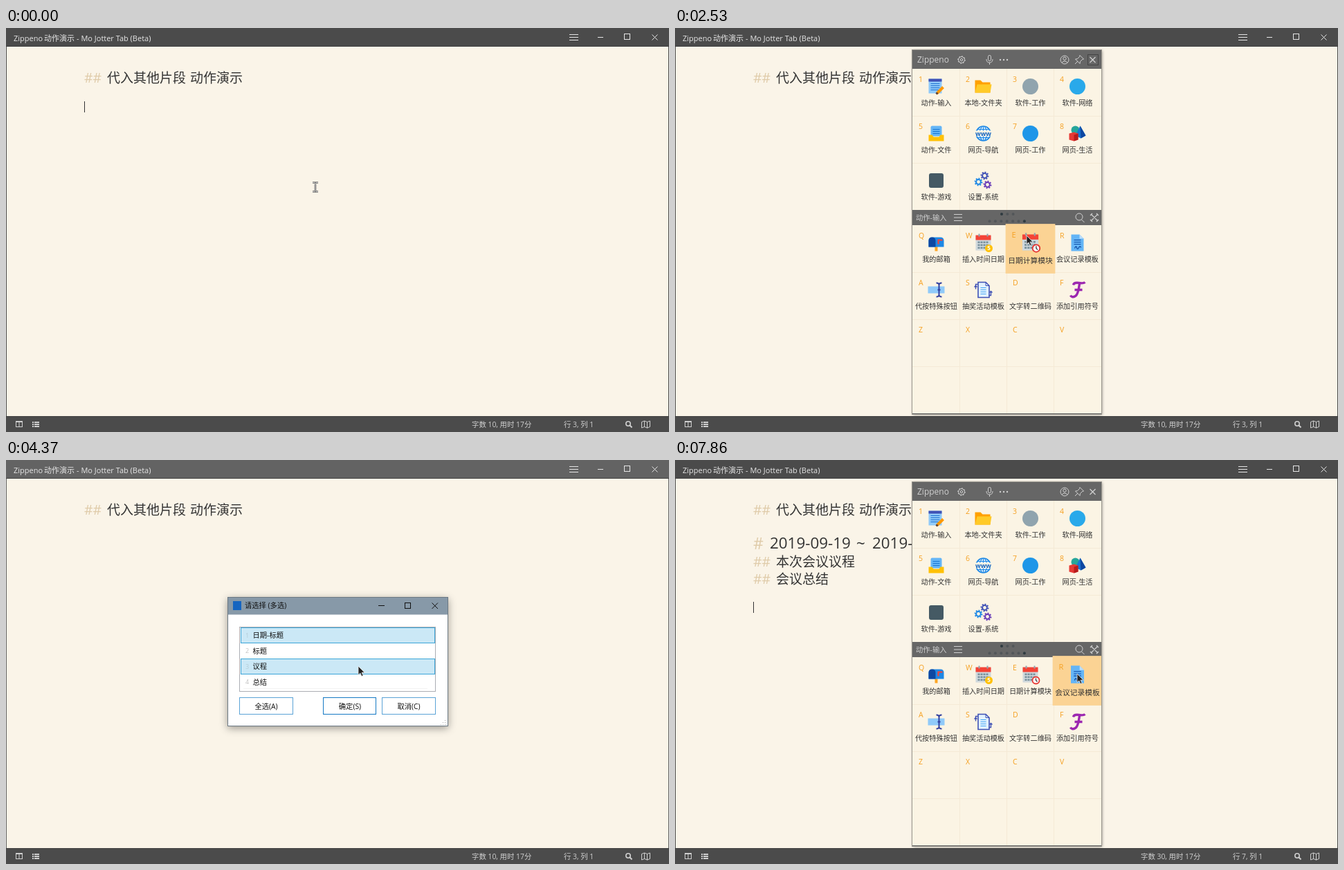
Write an HTML page that moves like this. It is 958 px wide and 584 px high and loops after 8000 ms.

```html
<!DOCTYPE html>
<html lang="zh-CN">
<head>
<meta charset="utf-8">
<title>动作演示</title>
<style>
  html, body { margin: 0; width: 100%; height: 100%; overflow: hidden; background: #faf4e8; }
  svg { display: block; width: 100%; height: 100%; }
  text { font-family: "Open Sans", "Noto Sans CJK SC", "Noto Sans CJK", sans-serif; white-space: pre; }
</style>
</head>
<body>
<svg id="stage" viewBox="0 0 958 584"></svg>
<script>
const LOOP = 8000;
const stage = document.getElementById('stage');

// Shape helpers; text is placed by its vertical centre.
const R = (x, y, w, h, fill, more = '') => `<rect x="${x}" y="${y}" width="${w}" height="${h}" fill="${fill}" ${more}/>`;
const C = (x, y, r, fill, more = '') => `<circle cx="${x}" cy="${y}" r="${r}" fill="${fill}" ${more}/>`;
const P = (d, stroke, w = 1, fill = 'none') => `<path d="${d}" stroke="${stroke}" stroke-width="${w}" fill="${fill}"/>`;
const T = (x, y, s, size, fill, more = '') => `<text x="${x}" y="${y + size * .37}" font-size="${size}" fill="${fill}" ${more}>${s}</text>`;
const G = (body, transform, more = '') => `<g transform="${transform}" ${more}>${body}</g>`;
const frame = (x, y, w, h, fill, stroke) => R(x + .5, y + .5, w - 1, h - 1, fill, `stroke="${stroke}"`);
const MID = 'text-anchor="middle"';
const rows = (x, w, ys, color) => P(ys.map(y => `M${x},${y}h${w}`).join(''), color);
const gear = (x, y, r, c, w = 2) => C(x, y, r, 'none', `stroke="${c}" stroke-width="${w}"`) +
  C(x, y, r + w * .8, 'none', `stroke="${c}" stroke-width="${w}" pathLength="16" stroke-dasharray="1"`);

// Icons, centred on 0,0
const form = R(-11, -11, 19, 21, '#90caf9') + R(-11, -11, 19, 4, '#3f51b5') +
  rows(-8, 13, [-4, -1, 2, 5], '#1e6fd0') + P('M1,10L10,1', '#ff9800', 4) + P('M0,11l2,-2', '#5d4037', 3);
const folder = P('M-12,-9h8l3,3h11v15h-22z', 'none', 0, '#ffa000') + P('M-9,-3h21l-2,12h-22z', 'none', 0, '#ffca28');
const tray = R(-8, -11, 16, 15, '#64b5f6', 'rx="2"') + rows(-5, 10, [-6, -3, 0], '#1976d2') +
  P('M-11,2h5l2,3h8l2,-3h5v9h-22z', 'none', 0, '#ffc107');
const globe = C(0, 0, 10.5, '#e3f2fd', 'stroke="#1e88e5" stroke-width="1.6"') +
  P('M0,-10v20M-9,-6h18M-9,6h18M-2,-10q-7,10 0,20M2,-10q7,10 0,20', '#1e88e5', 1.2) +
  R(-12, -4, 24, 8, '#faf3e3') + T(0, 0, 'www', 9, '#1565c0', MID + ' font-weight="700"');
const shapes = C(-3, -5, 6, '#26a69a') + P('M4,-11L12,3L5,7L-3,3z', 'none', 0, '#1976d2') + P('M4,-11L12,3L5,7z', 'none', 0, '#0d47a1') +
  P('M-12,0l7,-2l6,2v9l-6,2l-7,-2z', 'none', 0, '#e53935') + P('M-5,2l6,-2v9l-6,2z', 'none', 0, '#b71c1c');
const gears = gear(2, -7, 3.4, '#3f51b5') + gear(-7, 2, 3.4, '#1e88e5') + gear(6, 6, 3.4, '#673ab7');
const list = R(-11, -9, 22, 18, '#bbdefb') + R(-11, -9, 22, 3, '#64b5f6') + rows(0, 8, [-2, 4], '#1976d2') +
  R(-8, -4, 5, 4, '#42a5f5') + R(-8, 2, 5, 4, '#42a5f5');
const side = d => R(-10, -10, 14, 20, '#90caf9') + R(4, -10, 7, 20, '#455a64') + rows(6, 3, [-6, -2, 2, 6], '#90a4ae') +
  G(P('M-5,0h9M1,-3.5l3.5,3.5l-3.5,3.5', '#1565c0', 2), `translate(-2 0) scale(${d} 1)`);
const send = R(-10, -7, 17, 18, '#a6d4fa') + P('M-2,2L8,-8M0,-8.5H8.5V0', '#303f9f', 3.6);
const scroll = R(-6, -10, 15, 19, '#90caf9') + C(9, -7, 3, '#64b5f6') + R(-12, 5, 17, 5, '#64b5f6', 'rx="2"') +
  rows(-3, 8, [-5, -2, 1], '#1976d2');
const toolbar = R(-9, -12, 18, 24, '#64b5f6') + R(-7, -9, 14, 4, '#1565c0') + R(-7, -3, 14, 13, '#90caf9');
const sync = P('M-7.5,-11h11l5,5v17h-16z', '#3f51b5', 1.6, '#e3f2fd') + P('M3.5,-11v5h5', '#3f51b5') +
  rows(-4, 8, [-3, 0, 3, 6], '#42a5f5') + P('M-11,-1v-7h3M8,8h3v-6M-13,-4l2,-2l2,2M9,4l2,-2l2,2', '#3f51b5', 1.4);
const term = R(-10, -10, 20, 20, '#263238') + R(-10, -10, 20, 4, '#607d8b') + P('M-6,-2l3,3l-3,3M0,4h5', '#4dd0e1', 1.6);
const history = R(-12, -10, 13, 16, '#64b5f6') + R(-1, -5, 13, 16, '#90caf9') +
  P('M-10,-2h7M-6,-5l3,3l-3,3M10,4h-7M6,1l-3,3l3,3', '#0d47a1', 1.7);
const eye = R(-11, -9, 22, 18, '#bbdefb') + P('M-7,0q7,-8 14,0q-7,8 -14,0z', '#78909c', .8, '#fff') +
  C(0, 0, 3, '#26a69a') + C(0, 0, 1.4, '#263238');
const full = [0, 90, 180, 270].map(a => G(P('M3.5,-3.5L9,-9M4,-9.5H9.5V-4', '#2196f3', 2.2), `rotate(${a})`)).join('');
const mailbox = R(-2, 5, 4, 7, '#ffa726') + P('M-11,6v-9q0,-5 5,-5h12q5,0 5,5v9z', 'none', 0, '#1e88e5') +
  P('M-11,6v-9q0,-5 5,-5q5,0 5,5v9z', 'none', 0, '#0d47a1') + P('M3,2v-6h6', '#f44336', 2.2);
const calendar = R(-11, -10, 22, 21, '#cfd8dc') + R(-11, -11, 22, 7, '#f44336') + P('M-6,-13v4M6,-13v4', '#90a4ae', 2) +
  [-2, 2, 6].map(y => [-8, -4, 0, 4].map(x => R(x, y, 3, 2.5, '#78909c')).join('')).join('');
const coinDate = calendar + C(8, 8, 5.5, '#ffc107') + T(8, 8, '5', 8, '#fff', MID + ' font-weight="700"');
const clockDate = calendar + C(8, 8, 5, '#fff', 'stroke="#e53935" stroke-width="1.8"') + P('M8,5v3l2,2', '#333', 1.2);
const minutes = P('M-9,-12h12l6,6v18h-18z', 'none', 0, '#64b5f6') + P('M3,-12v6h6z', 'none', 0, '#bbdefb') +
  rows(-5, 10, [-4, -1, 2], '#0d47a1') + P('M-4,8q2,-5 3,-1t3,0t3,0', '#0d47a1', 1.2);
const field = R(-12, -5, 24, 10, '#90caf9') + P('M0,-10q4,0 4,3v14q0,3 -4,3M8,-10q-4,0 -4,3v14q0,3 4,3M2,0h4', '#303f9f', 2);
const fancy = P('M-6,-7q1,-4 8,-3t9,-1M3,-9q-2,16 -6,18q-5,3 -7,-1M-4,0h11', '#9c27b0', 3.4);

const TOP = [['动作-输入', form], ['本地-文件夹', folder], ['软件-工作', C(0, 0, 11.5, '#90a4ae')], ['软件-网络', C(0, 0, 11.5, '#29a9ea')],
  ['动作-文件', tray], ['网页-导航', globe], ['网页-工作', C(0, 0, 11.5, '#1e96e8')], ['网页-生活', shapes],
  ['软件-游戏', R(-10.5, -10.5, 21, 21, '#455a64', 'rx="3"')], ['设置-系统', gears], , ,];
const EXPORT = [['打开文档库', list], ['打开文档列表', side(1)], ['打开即时预览', side(-1)], ['导出文档', send],
  ['查看目录', scroll], ['显示工具栏', toolbar], ['专注模式', form], ['美化格式', sync], , , , ,
  ['命令面板', term], ['查看历史记录', history], ['查看预览', eye], ['全屏显示', full]];
const INPUT = [['我的邮箱', mailbox], ['插入时间日期', coinDate], ['日期计算模块', clockDate], ['会议记录模板', minutes],
  ['代按特殊按钮', field], ['抽奖活动模板', sync], ['文字转二维码', ''], ['添加引用符号', fancy], , , , , , , , ,];

// Screen refreshes: first time, last time, number of steps
const TICKS = [[0, 0, 1], [290, 370, 2], [830, 830, 1], [1300, 1300, 1], [1510, 1800, 5], [1960, 2690, 11], [2770, 3350, 9],
  [3490, 3780, 5], [3930, 3930, 1], [4090, 4370, 5], [4510, 4730, 4], [4890, 4960, 2], [5170, 5310, 3], [5460, 5900, 7],
  [6040, 6120, 2], [6430, 6430, 1], [6730, 6730, 1], [7180, 7180, 1], [7560, 7860, 5]];
const MOUSE = [[0, 447, 230], [830, 447, 232], [1440, 447, 232], [1800, 374, 92], [1960, 374, 92], [2544, 508, 300],
  [2690, 582, 316], [3060, 587, 325], [3420, 587, 325], [3780, 505, 258], [4020, 505, 258], [4300, 509, 298],
  [4440, 509, 298], [4730, 500, 340], [4820, 500, 340], [4960, 494, 328], [5100, 494, 328], [5310, 492, 355],
  [5400, 492, 355], [5820, 499, 299], [7500, 499, 299], [7860, 581, 309], [LOOP, 581, 309]];
const CARET = [[0, 370, 113, 106], [830, 1300, 113, 106], [1800, 2300, 113, 106], [5820, 6040, 222, 163],
  [6430, 6730, 113, 185], [6730, 7180, 113, 205], [7560, LOOP, 113, 205]];

const within = (t, a, b) => t >= a && t < b;
const clamp = v => Math.max(0, Math.min(1, v));

function snap(t) {
  const [a, b, n] = TICKS.filter(s => s[0] <= t).pop();
  if (n === 1) return a;
  const step = (b - a) / (n - 1);
  return a + step * Math.min(n - 1, Math.floor((t - a + 14) / step));
}

function mouseAt(t) {
  const i = MOUSE.findIndex(k => k[0] > t);
  const [t0, x0, y0] = MOUSE[i - 1], [t1, x1, y1] = MOUSE[i];
  const p = (t - t0) / (t1 - t0);
  return [x0 + (x1 - x0) * p, y0 + (y1 - y0) * p];
}

function editor(t) {
  const done = t >= 5820, bar = within(t, 2980, 5600) ? '#636363' : '#4b4b4b', ink = '#e6e6e6';
  const hash = (y, s, size) => T(113, y, s, size, '#dfcba9');
  const line = (y, s) => hash(y, '##', 19.4) + T(146, y, s, 19, '#333');
  const row = t >= 6730 ? 7 : t >= 6430 ? 6 : done ? 5 : 3;
  const col = within(t, 5820, 6430) ? 8 : 1;
  let s = R(0, 0, 958, 584, '#faf4e8') + R(0, 0, 958, 27, bar) + R(0, 26, 958, 1, '#404040') +
    R(0, 27, 1, 534, bar) + R(957, 27, 1, 534, bar) + R(0, 561, 958, 23, '#4b4b4b') + R(0, 561, 958, 1, '#404040') +
    T(11, 14.5, 'Zippeno', 11, ink) + T(55, 14.5, '动作演示', 11, ink) + T(102, 14.5, '- Mo Jotter Tab (Beta)', 11, ink) +
    rows(814, 13, [9.5, 13.5, 17.5], ink) + rows(855, 8, [13.5], ink) +
    frame(893, 8, 9, 9, 'none', ink) + P('M933.5,9.5l8,8m0,-8l-8,8', ink) +
    line(72, '代入其他片段') + T(266, 72, '动作演示', 19, '#333');
  if (done) s += hash(120, '#', 23) + T(137, 120, '2019-09-19', 22.4, '#333') + T(262, 120, '~', 22.4, '#333') +
    T(285, 120, '2019-09-26-', 22.4, '#333') + T(411, 120, '会议记录', 23, '#333') +
    line(147, '本次会议议程') + line(172, '会议总结');
  for (const [a, b, x, y] of CARET) if (within(t, a, b)) s += R(x, y, 1, x > 200 ? 18 : 16, '#333');
  const dim = '#cfcfcf';
  return s + T(673, 573, `字数 ${done ? 30 : 10}, 用时 17分`, 10.4, dim) + T(806, 573, `行 ${row}, 列 ${col}`, 10.4, dim) +
    frame(14, 568, 10, 9, 'none', dim) + P('M19,568v9M14,569.5h10', dim) +
    [569, 572, 575].map(y => R(38, y, 2, 2, dim) + R(41, y, 7, 2, dim)).join('') +
    C(899, 572, 3.2, 'none', `stroke="${dim}" stroke-width="1.6"`) + P('M901.5,574.5l3,3', dim, 2) +
    P('M918.5,569.5l4,-1.5l4,1.5l4,-1.5v8.5l-4,1.5l-4,-1.5l-4,1.5zM922.5,568v9M926.5,569.5v9', dim);
}

function cells(top, keys, items, [mx, my]) {
  const hot = my >= top && mx >= 343 && mx < 616 ? Math.floor((my - top) / 68) * 4 + Math.floor((mx - 343) / 68.2) : -1;
  const n = items.length / 4;
  let s = R(343, top, 273, n * 68, '#fbf4e4'), last = '';
  for (let c = 1; c < 4; c++) s += R(343 + c * 68, top, 1, n * 68, '#f5ead6');
  for (let r = 1; r < n; r++) s += R(343, top + r * 68, 273, 1, '#f5ead6');
  for (let i = 0; i < items.length; i++) {
    const over = i === hot && items[i];
    let cell = over ? R(-34, -34, 68, 68, '#fbd394') : '';
    if (keys[i]) cell += T(-25.5, -19, keys[i], 10.5, '#f5a021');
    if (items[i]) cell += G(items[i][1], 'translate(0 -8.5)') + T(0, 15.7, items[i][0], 10.2, '#333', MID);
    cell = G(cell, `translate(${377.5 + i % 4 * 68} ${top + 34 + (i >> 2) * 68})${over ? ' scale(1.055)' : ''}`);
    if (over) last = cell; else s += cell;
  }
  return s + last;
}

function panel(t, mouse) {
  const input = t >= 1960, ink = '#d0d0d0', bar = '#666';
  const n = input ? 7 : 6, x0 = input ? 454.5 : 459, on = input ? 6 : 0, menu = input ? 403 : 425;
  const dot = (x, y, hot) => C(x, y, 2, hot ? '#2f3a40' : '#525659');
  let s = R(343, 32, 273, 27, bar) + T(350, 46, 'Zippeno', 12, ink) + gear(414, 46, 4.4, ink, 1) + C(414, 46, 1.7, 'none', `stroke="${ink}"`) +
    R(452.5, 39.5, 4, 8, 'none', `rx="2" stroke="${ink}"`) + P('M450,45q0,5 4.5,5t4.5,-5M454.5,50v3', ink) +
    [470, 475, 480].map(x => C(x, 46, 1.2, ink)).join('') +
    C(563, 46, 6, 'none', `stroke="${ink}"`) + C(563, 44.2, 2.2, 'none', `stroke="${ink}"`) + P('M559,50q4,-4 8,0', ink) +
    P('M585,39.5l5.5,5.5l-2,.5l-3,3l-.5,3l-6.5,-6.5l3,-.5l3,-3zM582,48l-4,4', ink) + P('M599.5,42l8,8m0,-8l-8,8', ink, 1.3);
  if (t < 2770) s += R(596.5, 38.5, 15, 15, 'none', 'stroke="#222" stroke-dasharray="1"');
  s += cells(59, '12345678', TOP, my(mouse, 59, 263)) + R(343, 263, 273, 22, bar);
  s += input ? T(348, 274, '动作-输入', 10.3, ink) : C(354, 274, 6, '#f79a1c') + T(364, 274, '界面与导出', 10.3, ink);
  s += rows(menu, 12, [269.5, 274, 278.5], ink);
  for (let i = 0; i < 3; i++) s += dot(472 + i * 8.3, 269, !i);
  for (let i = 0; i < n; i++) s += dot(x0 + i * 8.4, 279.3, i === on);
  s += C(584, 273, 5, 'none', `stroke="${ink}"`) + P('M587.5,277l4,4', ink) +
    P('M601,269l10,10M611,269l-10,10M600,271l3,-3M609,268l3,3M600,277l3,3M609,280l3,-3', ink, 1.2) +
    cells(285, 'QWERASDFZXCV', input ? INPUT : EXPORT, my(mouse, 285, 557));
  return R(343, 32, 273, 526, bar, 'filter="url(#soft)"') + `<g clip-path="url(#pane)">${s}</g>` +
    frame(342, 31, 275, 528, 'none', '#9a978f');
}

// Keeps the pointer only while it lies between two heights.
function my(mouse, a, b) { return within(mouse[1], a, b) ? mouse : [-1, -1]; }

function dialog(t, [mx, y]) {
  const fading = t > 5400;
  const p = fading ? clamp(1 - (t - 5390) / 250) : clamp((t - 3000) / 280);
  const scale = fading ? 1 - .06 * (1 - p) : 1 - .09 * (1 - p) ** 2;
  const picked = [3930, LOOP, 4370, 4960];
  let s = R(320, 198, 319, 187, '#fff', 'filter="url(#deep)"') + R(320, 198, 319, 25.5, '#8799a8') +
    frame(320, 198, 319, 187, 'none', '#6b7883') + R(328, 204, 12, 13, '#1565c0') + T(345, 210.5, '请选择 (多选)', 10.3, '#111') +
    rows(538, 9, [210.5], '#111') + frame(576, 206, 9, 9, 'none', '#111') + P('M615.5,206.5l8.5,8.5m0,-8.5l-8.5,8.5', '#111') +
    frame(337, 241, 284, 94, '#fff', '#abadb3');
  ['日期-标题', '标题', '议程', '总结'].forEach((name, i) => {
    const top = 242 + i * 22.5, on = t >= picked[i], over = within(y, top, top + 22.5) && within(mx, 339, 620);
    s += R(343, Math.round(top + 20), 266, 1, '#f2f2f2');
    if (on || over) s += frame(339, Math.round(top), 281, 23, on ? '#cbe8f6' : '#e5f3fb', on ? '#3aa5d8' : '#70c0e7');
    s += T(346, top + 11.5, i + 1, 9, on ? '#b4cdd8' : '#c4c4c4') + T(356.5, top + 11.3, name, 10.3, '#111');
  });
  [[337, '全选(A)'], [458, '确定(S)'], [543, '取消(C)']].forEach(([x, name], i) => {
    const over = within(mx, x, x + 78) && within(y, 343, 368);
    s += frame(x, 343, i === 1 ? 77 : 78, 25, over ? '#d9ecfa' : '#fff', i === 1 || over ? '#1579c4' : '#5ba3d6') +
      T(x + 39, 355.8, name, 10.3, '#111', MID);
  });
  for (let i = 0; i < 3; i++) for (let j = 0; j <= i; j++) s += R(634 - j * 3, 376 + i * 3, 1, 1, '#aaa');
  return G(s, `translate(479.5 291.5) scale(${scale}) translate(-479.5 -291.5)`, `opacity="${p}"`);
}

function pointer(t, [x, y]) {
  if (within(t, 290, 830) || within(t, 6430, 7560)) return '';
  const beam = 'M-4,-6.5h3l1,1l1,-1h3M0,-5.5v11M-4,6.5h3l1,-1l1,1h3';
  const shape = t < 290 || within(t, 6120, 6430)
    ? P(beam, '#666', 2.6) + P(beam, '#ddd', .8)
    : P('M0,0v12.6l2.9,-2.6l2,4.6l2.2,-1l-2,-4.4h4z', '#eee', .8, '#222');
  return G(shape, `translate(${x} ${y})`);
}

const DEFS = `<defs><clipPath id="pane"><rect x="343" y="32" width="273" height="526"/></clipPath>
  <filter id="soft"><feDropShadow dx="1" dy="1" stdDeviation="2" flood-opacity=".45"/></filter>
  <filter id="deep" x="-20%" y="-20%" width="140%" height="150%"><feDropShadow dx="0" dy="3" stdDeviation="6" flood-opacity=".38"/></filter></defs>`;

function scene(t) {
  const mouse = mouseAt(t);
  let s = DEFS + editor(t);
  if (within(t, 830, 2770) || t >= 7560) s += panel(t, mouse);
  if (within(t, 3000, 5640)) s += dialog(t, mouse);
  return s + pointer(t, mouse);
}

let shown = -1;
const start = performance.now();
function draw() {
  const t = snap((performance.now() - start) % LOOP);
  if (t !== shown) stage.innerHTML = scene(shown = t);
  requestAnimationFrame(draw);
}
draw();
</script>
</body>
</html>
```
